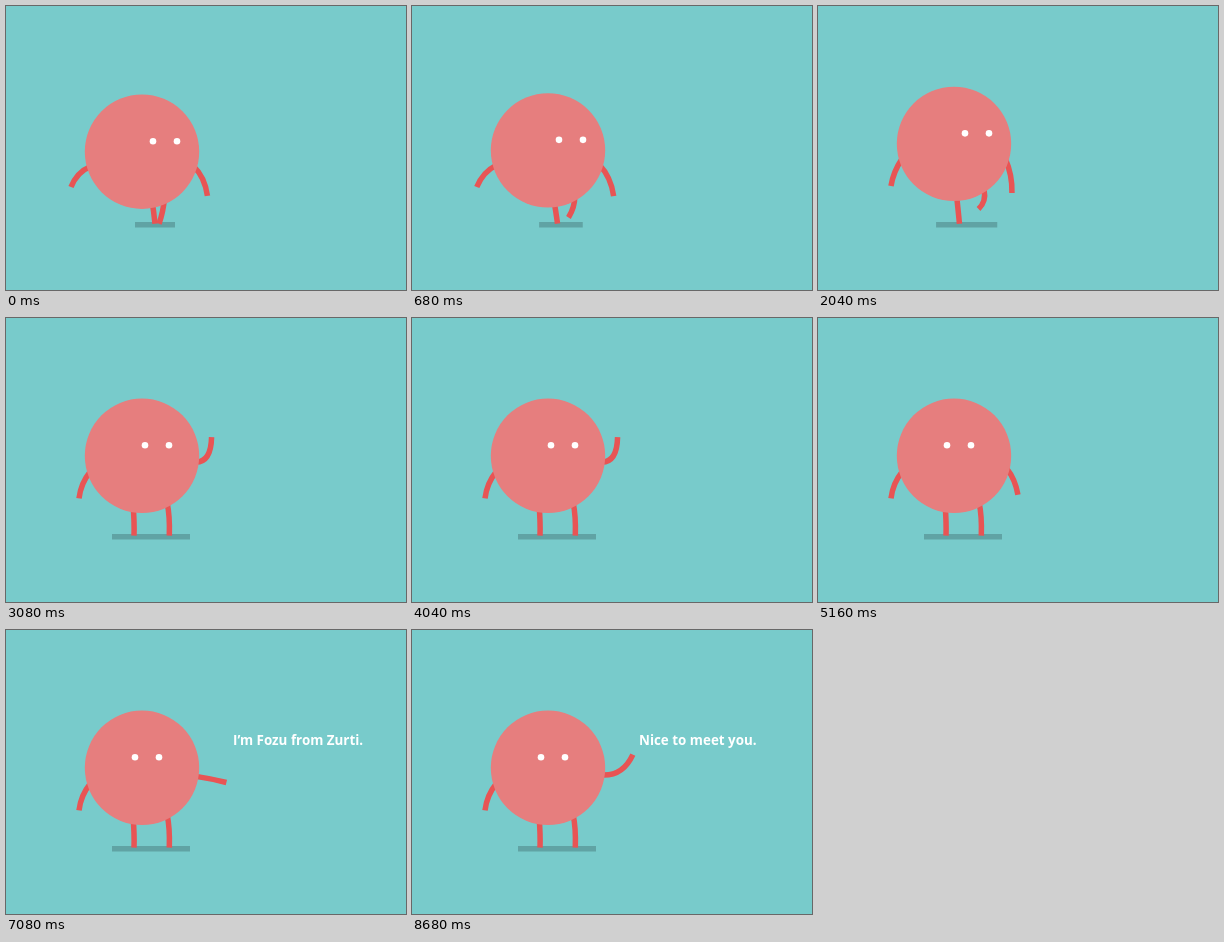
Write an HTML page that moves like this. It is 400x284 px and loops after 9.8 s.

```html
<!DOCTYPE html>
<html lang="en">
<head>
<meta charset="utf-8">
<title>Greeting</title>
<style>
  html, body { margin: 0; width: 100%; height: 100%; overflow: hidden; background: #78cbcb; }
  svg { display: block; width: 100%; height: 100%; }
  text { font: 700 13.4px "Open Sans", sans-serif; fill: #fff; }
  .limb { fill: none; stroke: #e85454; stroke-width: 5.5; }
</style>
</head>
<body>
<svg viewBox="0 0 400 284">
  <rect id="shadow" y="216" height="5.5" fill="#60a3a4"/>
  <path class="limb" id="legA"/>
  <path class="limb" id="legB"/>
  <path class="limb" id="armLeft"/>
  <path class="limb" id="armRight"/>
  <circle id="body" cx="136" r="57.2" fill="#e67e7e"/>
  <circle class="eye" r="3.3" fill="#fff"/>
  <circle class="eye" r="3.3" fill="#fff"/>
  <text id="speech" x="227" y="115"></text>
</svg>
<script>
const LOOP = 9800, STEP = 40, STRIDE = 640, REST_Y = 137.8;
const DEG = Math.PI / 180;
const el = id => document.getElementById(id);
const eyes = document.querySelectorAll('.eye');

const lerp = (a, b, k) => a + (b - a) * k;
const mix = (a, b, k) => a.map((v, i) => lerp(v, b[i], k));
const ease = k => (1 - Math.cos(Math.PI * k)) / 2;

// Eased value of a list of [time, value] keys.
function track(keys, t) {
  const next = keys.findIndex(key => key[0] > t);
  if (next === 0) return keys[0][1];
  if (next < 0) return keys[keys.length - 1][1];
  const [t0, v0] = keys[next - 1], [t1, v1] = keys[next];
  return lerp(v0, v1, ease((t - t0) / (t1 - t0)));
}

// Right arm: shoulder x, y, then bend and hand as radius and angle.
const ARM_POSES = [
  [189, 151, 13, 51, 28, 67],       // hanging
  [190, 146.5, 15, 9, 30.5, 15],    // stretched out
  [190, 145, 21, 3, 37, -33.5],     // raised
  [190, 144, 15, 0, 29.4, -58]      // waving inwards
];
const ARM_KEYS = [
  [2360, 0], [2840, 2], [3080, 3], [3320, 2], [3560, 3], [3800, 2], [4040, 3], [4640, 0],
  [5200, 0], [5720, 2], [6680, 2], [7520, 0], [7900, 0], [8680, 2]
];
const STAND_KEYS = [[2140, 0], [2440, 1]];
const GAZE_KEYS = [[2280, 11], [2680, 3], [4040, 3], [4640, -7]];
const LINES = [
  [3160, 3960, 'Oh, hi there.'],
  [5480, 7720, 'I’m Fozu from Zurti.'],
  [8280, LOOP, 'Nice to meet you.']
];

function armPose(p) {
  const i = Math.min(Math.floor(p), ARM_POSES.length - 2);
  const [x, y, r1, a1, r2, a2] = mix(ARM_POSES[i], ARM_POSES[i + 1], p - i);
  const at = (r, a) => [x + r * Math.cos(a * DEG), y + r * Math.sin(a * DEG)];
  return [x, y, ...at(r1, a1), ...at(r2, a2)];
}

// Hip, knee and foot of one walking leg; side is -1 or 1.
function walkLeg(angle, side, bodyY) {
  const hip = 152 - side * 14.1 * Math.cos(angle + 117.5 * DEG);
  const foot = 151 - side * 9.7 * Math.cos(angle + 102 * DEG);
  const lift = Math.max(0, side * Math.sin(angle));
  const footY = 217.7 - 16 * lift;
  return [hip, bodyY + 46, lerp(hip, foot, .4) + 1 + 4 * lift, footY - 12 + 5 * lift, foot, footY];
}

function limb(id, [x, y, bx, by, ex, ey]) {
  el(id).setAttribute('d', `M${x} ${y}Q${bx} ${by} ${ex} ${ey}`);
}

function draw(t) {
  const angle = 2 * Math.PI * t / STRIDE;
  const bounce = Math.cos(2 * angle);
  const swing = Math.cos(2 * angle - 25 * DEG);
  const stand = track(STAND_KEYS, t);
  const walkY = 141.1 + 4.6 * bounce;
  const bodyY = lerp(walkY, REST_Y, stand);

  limb('legA', mix(walkLeg(angle, -1, walkY), [127, 186, 128.5, 204, 128, 217.7], stand));
  limb('legB', mix(walkLeg(angle, 1, walkY), [161, 184, 164, 198, 163.3, 217.7], stand));
  limb('armLeft', mix(
    [84, walkY + 15, 74 - 3.3 * swing, 166, 70.8 - 6.4 * swing, 180.3 + .8 * swing],
    [84, 154, 75, 165, 73, 180.3], stand));
  limb('armRight', mix(
    [187, walkY + 14, 195.7 + 3.6 * swing, 169.5 + 1.6 * swing, 196 + 6 * swing, 187.8 + 2.4 * swing],
    armPose(track(ARM_KEYS, t)), stand));

  const [left, right] = mix([122.6 + 6.4 * bounce, 175 - 6 * bounce], [106, 184], stand);
  el('shadow').setAttribute('x', left);
  el('shadow').setAttribute('width', right - left);

  el('body').setAttribute('cy', bodyY);
  const gaze = track(GAZE_KEYS, t);
  eyes.forEach((eye, i) => {
    eye.setAttribute('cx', 136 + gaze + 24 * i);
    eye.setAttribute('cy', bodyY - 10.5);
  });

  const line = LINES.find(([from, to]) => t >= from && t < to);
  el('speech').textContent = line ? line[2] : '';
}

const start = performance.now();
function frame() {
  const t = (performance.now() - start) % LOOP;
  draw(Math.floor(t / STEP) * STEP);
  requestAnimationFrame(frame);
}
frame();
</script>
</body>
</html>
```
